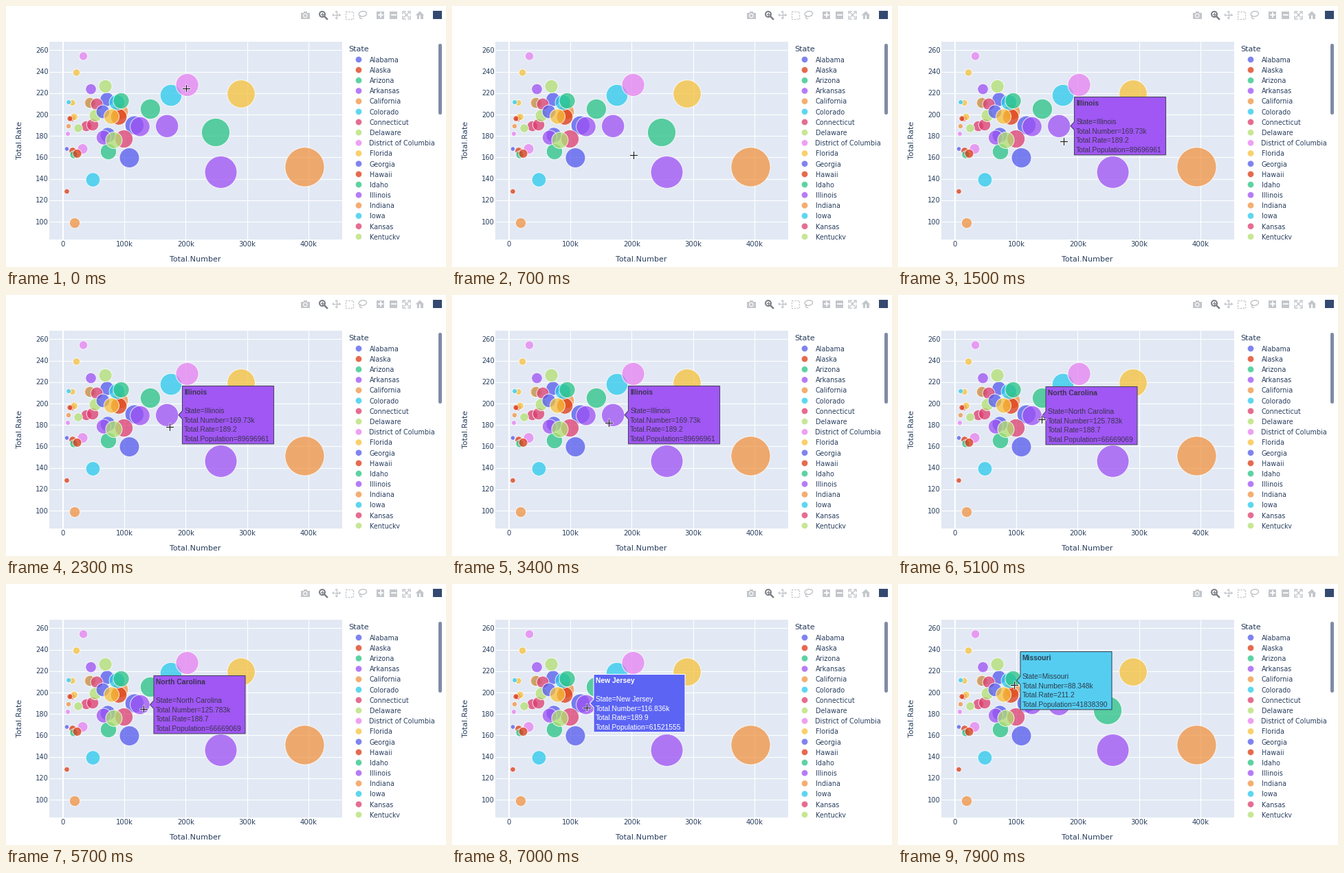
Animation of 640 by 380 pixels, one loop 8 s. Source, as a matplotlib script:

```python
import numpy as np
import matplotlib.pyplot as plt
from matplotlib.animation import FuncAnimation
from matplotlib.patches import Arc, Circle, Ellipse, FancyBboxPatch, Polygon, Rectangle

W, H, DPI = 640, 380, 100
PT = 72 / DPI
STEP, FRAMES = 100, 80

INK, PAPER, ICON, ICON_ON = "#2a3f5f", "#e2e9f4", "#c3c6ca", "#7c8087"
PALETTE = ["#5459ec", "#dd3813", "#27c384", "#9d50f3", "#f19341",
           "#28c9ec", "#dd3c6d", "#b3e071", "#e781f0", "#f7c139"]

fig = plt.figure(figsize=(W / DPI, H / DPI), dpi=DPI, facecolor="white")
ax = fig.add_axes([0, 0, 1, 1])
ax.set_xlim(0, W)
ax.set_ylim(H, 0)
ax.axis("off")


def px(thousands):
    return 82.5 + 0.894 * thousands


def py(rate):
    return 314 - 1.56 * (rate - 100)


def text(x, y, s, size, color=INK, font="DejaVu Sans", z=8, **kw):
    kw.setdefault("va", "baseline")
    return ax.text(x, y, s, fontsize=size * PT, color=color, family=font, zorder=z, **kw)


def line(xs, ys, color, width, z=1, **kw):
    return ax.plot(xs, ys, color=color, lw=width * PT, zorder=z, **kw)[0]


def rect(x0, y0, x1, y1, color, z=0):
    ax.add_patch(Rectangle((x0, y0), x1 - x0, y1 - y0, fc=color, ec="none", zorder=z))


def bubble(x, y, r, k, z, edge=1.0):
    ax.add_patch(Circle((x, y), r, fc=PALETTE[k % 10], ec="none", alpha=0.75, zorder=z))
    ax.add_patch(Circle((x, y), r, fc="none", ec="white", lw=edge * PT, alpha=0.8, zorder=z))


def draw_axes():
    rect(63, 51.5, 489, 340, PAPER)
    for k in range(5):
        x = px(100 * k)
        line([x, x], [51.5, 340], "white", 1.1 if k else 2, solid_capstyle="butt")
        text(x, 349.5, f"{k}00k" if k else "0", 10.1, ha="center")
    for v in range(100, 261, 20):
        y = py(v)
        line([63, 489], [y, y], "white", 1.1, solid_capstyle="butt")
        text(62, y + 3.7, str(v), 9.9, ha="right")
    text(275, 372, "Total.Number", 11.1, ha="center")
    text(20, 195.5, "Total.Rate", 11.1, ha="center", va="center", rotation=90)


# (number in thousands, rate) for each state in alphabetical order
DATA = [
    (72.1, 214.1), (6.7, 128.2), (74.4, 165.4), (45.9, 223.7), (393.7, 151),
    (49.2, 139.1), (38.6, 189.1), (14.5, 196), (8.4, 182), (290.3, 219.2),
    (108.5, 159.6), (16.2, 166), (17.9, 162.5), (169.7, 189.2), (93.4, 202.6),
    (45.9, 210.6), (48.7, 190.4), (69.4, 226.3), None, (22.4, 239.1),
    (73.3, 180.8), (91.2, 197.8), (142.6, 205.1), (66.6, 178.5), (44.2, 210.9),
    (88.3, 211.2), (15.1, 196.2), (25.2, 187.2), (32.4, 167.9), (18.5, 197.8),
    (116.8, 189.9), (23.5, 163.5), (248.9, 183.3), (125.8, 188.7), (9.5, 189.1),
    (176.2, 217.9), (55.4, 209.6), (53.1, 199), (202.5, 227.6), (15.7, 210.9),
    (65.4, 202.6), (11.7, 196.2), (95.1, 212.8), (257.3, 146.2), (19.6, 98.7),
    (9.7, 211.5), (99.6, 177.2), (83.3, 176), (33.6, 254.5), (79.4, 198.1),
    (6.7, 167.9),
]


def draw_bubbles():
    # area follows population, which is number over rate
    for k, state in enumerate(DATA):
        if state:
            number, rate = state
            r = 17.9 * np.sqrt(number / rate) - 0.3
            bubble(px(number), py(rate), r, k, 2)


STATES = ["Alabama", "Alaska", "Arizona", "Arkansas", "California", "Colorado",
          "Connecticut", "Delaware", "District of Columbia", "Florida", "Georgia",
          "Hawaii", "Idaho", "Illinois", "Indiana", "Iowa", "Kansas", "Kentucky"]


def draw_legend():
    text(498, 66.5, "State", 11.3)
    for k, name in enumerate(STATES):
        y = 78 + 15.17 * k
        bubble(513, y, 4.6, k, 3, 0.6)
        text(528.5, y + 3.8, name, 9.6, z=3)
    rect(490, 340, 628, 352, "white", 9)
    ax.add_patch(FancyBboxPatch((631, 57), 1, 99, boxstyle="round,pad=0,rounding_size=0.5",
                                fc="#808ba4", ec="#808ba4", lw=4 * PT, zorder=4))


def draw_toolbar():
    cy = 13
    # camera
    rect(429, 10, 441.5, 18.5, ICON, 4)
    rect(432.5, 8, 438, 11, ICON, 4)
    ax.add_patch(Circle((435.3, 14), 2.7, fc=ICON, ec="white", lw=1.1 * PT, zorder=5))
    # zoom
    ax.add_patch(Circle((460, 12), 4, fc="none", ec=ICON_ON, lw=2 * PT, zorder=4))
    line([463, 467], [15, 19], ICON_ON, 2.5, 4)
    line([458, 462], [12, 12], ICON_ON, 1.2, 4)
    line([460, 460], [10, 14], ICON_ON, 1.2, 4)
    # pan
    mid = np.array([480.5, cy])
    for d in np.array([(1, 0), (-1, 0), (0, 1), (0, -1)]):
        tip, side = mid + 6.3 * d, 2.4 * d[::-1]
        line(*zip(mid, tip - d), ICON, 1.3, 4)
        ax.add_patch(Polygon([tip, tip - 2.6 * d + side, tip - 2.6 * d - side],
                             fc=ICON, ec="none", zorder=4))
    # box select
    ax.add_patch(Rectangle((494, 7.5), 11, 11, fc="none", ec=ICON, lw=1.4 * PT,
                           ls=(0, (1.6, 1.2)), zorder=4))
    # lasso
    ax.add_patch(Ellipse((518.8, 11.5), 11.5, 7.5, angle=-10, fc="none", ec=ICON,
                         lw=1.5 * PT, zorder=4))
    ax.add_patch(Arc((517, 16), 5, 5, theta1=60, theta2=250, color=ICON,
                     lw=1.4 * PT, zorder=4))
    # zoom in, zoom out
    for x in (544.5, 563.5):
        rect(x - 5.5, cy - 5.5, x + 5.5, cy + 5.5, ICON, 4)
        line([x - 3, x + 3], [cy, cy], "white", 1.8, 5)
    line([544.5, 544.5], [cy - 3, cy + 3], "white", 1.8, 5)
    # autoscale
    for sx in (-1, 1):
        for sy in (-1, 1):
            x, y = 582.5 + 5.5 * sx, cy + 5.5 * sy
            line([x - 3.5 * sx, x, x], [y, y, y - 3.5 * sy], ICON, 1.5, 4)
            line([582.5, x - 2 * sx], [cy, y - 2 * sy], ICON, 1.4, 4)
    # home
    ax.add_patch(Polygon([(595.5, 13.5), (602, 7.5), (608, 13.5)], fc=ICON, ec="none", zorder=4))
    for x in (597.5, 603):
        rect(x, cy, x + 3.5, cy + 5.5, ICON, 4)
    # plain square
    rect(621, 6.5, 633.5, 19, "#33496f", 4)


draw_axes()
draw_bubbles()
draw_legend()
draw_toolbar()

PURPLE, DARK, EDGE = "#a057f4", "#3b3350", "#4a4560"
# start ms, arrow tip x, box top, fill, ink, border, name, number, rate, population
TIPS = [
    (1500, 251, 132.5, PURPLE, DARK, EDGE, "Illinois", "169.73k", "189.2", "89696961"),
    (4800, 209.5, 133.5, PURPLE, DARK, EDGE, "North Carolina", "125.783k", "188.7", "66669069"),
    (6400, 200.5, 131.5, "#5b64f3", "white", "white", "New Jersey", "116.836k", "189.9", "61521555"),
    (7500, 172.5, 98.5, "#55cdf1", "#2c3e50", "#3c4a58", "Missouri", "88.348k", "211.2", "41838390"),
]
TIP_W, TIP_H = 133, 84.3

box = ax.add_patch(Polygon([(0, 0), (1, 0), (1, 1)], lw=1.1 * PT, zorder=10))
rows = [text(0, 0, "", 10.25, font="Liberation Sans", z=11,
             weight="normal" if k else "bold") for k in range(5)]

# time in ms, x, y
PATH = [(0, 262, 119.5), (700, 264, 217), (1500, 241, 197), (2300, 238, 192),
        (4500, 218, 180), (5700, 200, 181.5), (6400, 191, 178), (7000, 196, 179.5),
        (7900, 169, 147)]
PATH_T, PATH_X, PATH_Y = zip(*PATH)
halo = [line([], [], "white", 2.6, 12, alpha=0.75) for _ in range(2)]
cross = [line([], [], "#16161c", 1.1, 13) for _ in range(2)]


def show_tip(t):
    tip = next((tip for tip in reversed(TIPS) if t >= tip[0]), None)
    for part in (box, *rows):
        part.set_visible(tip is not None)
    if tip is None:
        return
    _, x, top, fill, ink, border, name, number, rate, people = tip
    left, right = x + 5.5, x + 5.5 + TIP_W
    mid, bottom = top + TIP_H / 2, top + TIP_H
    box.set_xy([(x, mid), (left, mid - 6), (left, top), (right, top),
                (right, bottom), (left, bottom), (left, mid + 6)])
    box.set_facecolor(fill)
    box.set_edgecolor(border)
    lines = [name, f"State={name}", f"Total.Number={number}",
             f"Total.Rate={rate}", f"Total.Population={people}"]
    for row, slot, s in zip(rows, (0, 2, 3, 4, 5), lines):
        row.set_text(s)
        row.set_color(ink)
        row.set_position((left + 2.7, top + 12.5 + 13.55 * slot))


def update(i):
    t = i * STEP
    show_tip(t)
    x, y = np.interp(t, PATH_T, PATH_X), np.interp(t, PATH_T, PATH_Y)
    for h, v in (halo, cross):
        h.set_data([x - 4.8, x + 4.8], [y, y])
        v.set_data([x, x], [y - 4.8, y + 4.8])
    return [box, *rows, *halo, *cross]


anim = FuncAnimation(fig, update, frames=FRAMES, interval=STEP, repeat=True,
                     repeat_delay=0, blit=False)
plt.show()
```
